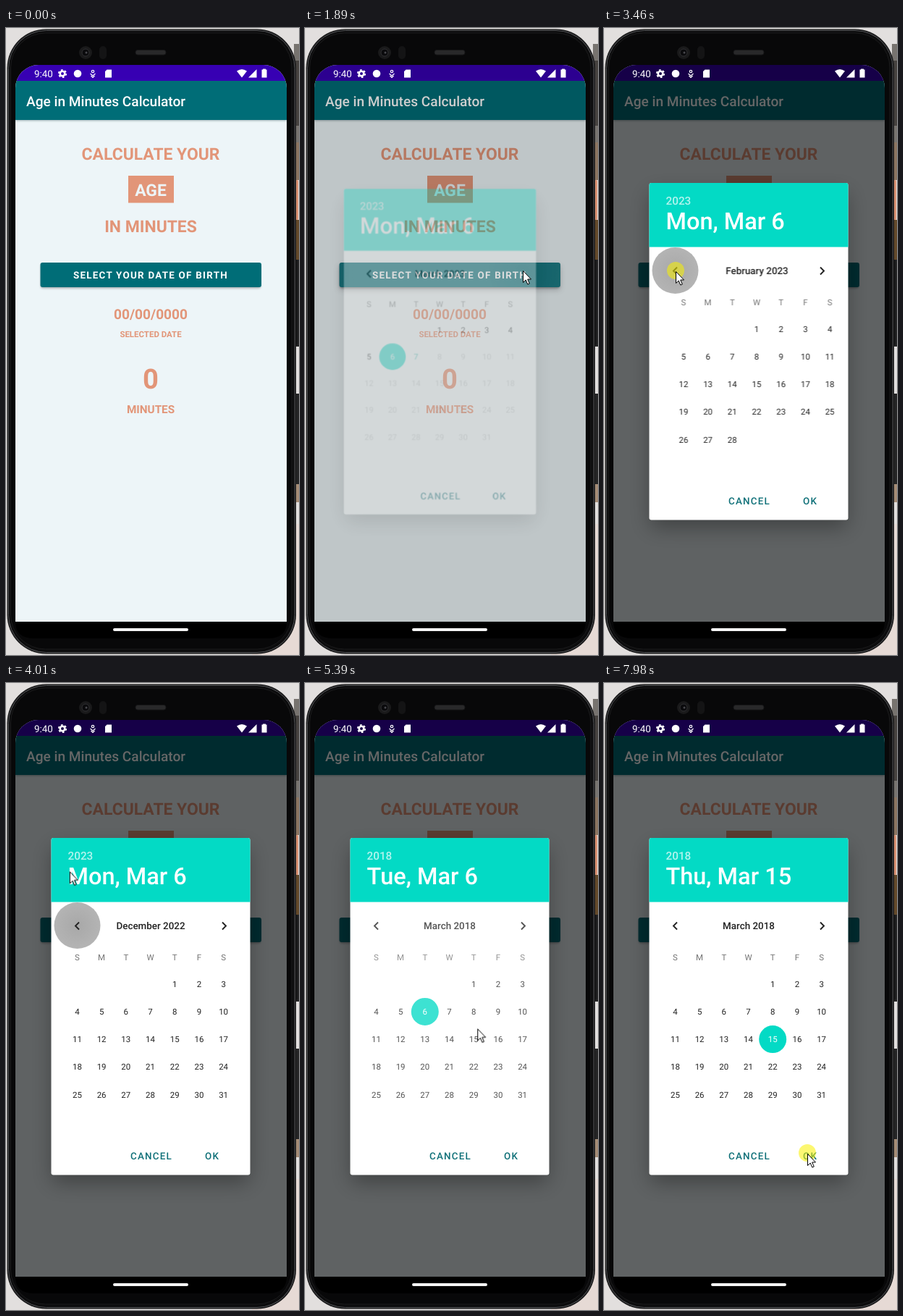
These frames come from a looping animation (405 by 866 pixels, 8000 ms). An HTML page:

```html
<!DOCTYPE html>
<html lang="en">
<head>
<meta charset="utf-8">
<title>Age in Minutes Calculator</title>
<style>
  html, body { margin: 0; width: 100%; height: 100%; overflow: hidden; background: #0b0b0b; }
  svg { display: block; font-family: Roboto, sans-serif; text-rendering: geometricPrecision; }
  text { white-space: pre; }
  .mid { text-anchor: middle; }
  .bold { font-weight: 700; }
  .med { font-weight: 500; }
  .orange { fill: #e29578; }
  .day { font-size: 11.46px; text-anchor: middle; fill: #222; }
  .week { fill: #757575; }
  .off { fill: #c6c6c6; }
  .today { fill: #2bb5a8; }
  .white { fill: #fff; }
  .action { font-size: 13.4px; font-weight: 500; letter-spacing: 1.2px; fill: #0f7078; }
  .date { font-size: 32.5px; font-weight: 500; }
  .year { font-size: 15.3px; font-weight: 500; }
  .row { font-size: 15.3px; text-anchor: middle; fill: #333; }
  .row.on { font-size: 24.8px; fill: #03dac5; }
  .chevron { fill: none; stroke: #222; stroke-width: 1.9; }

  .anim { animation: 8s linear infinite; }
  .hard { animation: 8s step-end infinite; }
  .grow { transform-box: fill-box; transform-origin: center; }

  #cursor { animation-name: cursor; }
  @keyframes cursor {
    0%, 5.6% { transform: translate(408px, 339px); }
    8% { transform: translate(340px, 322px); }
    10.5%, 28.2% { transform: translate(301px, 335px); }
    32.4% { transform: translate(125px, 363px); }
    34.4% { transform: translate(110px, 368px); }
    37.9%, 49.1% { transform: translate(99px, 336px); }
    50.1% { transform: translate(88px, 261px); }
    51.5%, 59.4% { transform: translate(81px, 236px); }
    63%, 65.2% { transform: translate(188px, 362px); }
    67.4% { transform: translate(238.5px, 478px); }
    69%, 69.5% { transform: translate(242px, 500px); }
    74.5% { transform: translate(264px, 618px); }
    79.1%, 83% { transform: translate(230px, 497px); }
    88.9%, 100% { transform: translate(281px, 650px); }
  }
  #press { animation-name: press; }
  @keyframes press {
    0%, 18.2%, 40.2%, 43.5%, 46.6%, 54.3%, 65%, 82% { opacity: 0; }
    16.5%, 39.1%, 42.4%, 45.5%, 53%, 64%, 80.4%, 99.7%, 100% { opacity: .55; }
  }
  #splash { animation-name: splash; }
  @keyframes splash {
    0%, 16.4% { transform: scale(.05); opacity: 0; }
    16.6% { transform: scale(.05); opacity: 1; }
    21%, 23% { transform: scale(1); opacity: 1; }
    25.4%, 100% { transform: scale(1); opacity: 0; }
  }
  #lift { animation-name: lift; }
  @keyframes lift {
    0%, 16.5%, 25.4%, 100% { opacity: 0; }
    18.5%, 23% { opacity: 1; }
  }
  #scrim { animation-name: appear; }
  @keyframes appear { 0%, 22.8% { opacity: 0; } 25.4%, 100% { opacity: 1; } }
  #dialog { animation-name: open; }
  @keyframes open {
    0%, 22.8% { opacity: 0; transform: scale(.95); }
    25.4%, 100% { opacity: 1; transform: none; }
  }
  #pager { animation-name: page; animation-timing-function: ease-out; }
  @keyframes page {
    0%, 40% { transform: none; }
    42.7%, 43.2% { transform: translateX(275px); }
    45.7%, 46.2% { transform: translateX(550px); }
    48.8%, 100% { transform: translateX(825px); }
  }
  #ripple { animation-name: ripple; }
  @keyframes ripple {
    0%, 39.1% { opacity: 0; transform: scale(.3); }
    41%, 58.8% { opacity: 1; transform: none; }
    59%, 100% { opacity: 0; transform: none; }
  }
  #calendar { animation-name: calendar; }
  @keyframes calendar {
    0%, 54.8% { opacity: 1; }
    58.8%, 65% { opacity: 0; }
    68.1%, 100% { opacity: 1; }
  }
  #years { animation-name: years; }
  @keyframes years {
    0%, 54.8% { opacity: 0; }
    58.8%, 65% { opacity: 1; }
    67.3%, 100% { opacity: 0; }
  }
  #yearTitle { animation-name: yearTitle; }
  @keyframes yearTitle { 0%, 65% { opacity: .7; } 54.8% { opacity: 1; } 100% { opacity: .7; } }
  #dateTitle { animation-name: dateTitle; }
  @keyframes dateTitle { 0%, 65% { opacity: 1; } 54.8% { opacity: .7; } 100% { opacity: 1; } }
  #rowPress { animation-name: rowPress; }
  @keyframes rowPress { 0%, 66.5% { opacity: 0; } 64% { opacity: .1; } 100% { opacity: 0; } }
  #dayPress { animation-name: dayPress; }
  @keyframes dayPress { 0%, 82% { opacity: 0; } 80.4% { opacity: .13; } 100% { opacity: 0; } }
  #next { animation-name: next; }
  @keyframes next { 0% { opacity: 0; } 42%, 100% { opacity: 1; } }

  /* Stages of the chosen date */
  .first { animation-name: first; }
  @keyframes first { 0% { opacity: 1; } 65%, 100% { opacity: 0; } }
  .changed { animation-name: changed; }
  @keyframes changed { 0% { opacity: 0; } 65%, 100% { opacity: 1; } }
  .second { animation-name: second; }
  @keyframes second { 0% { opacity: 0; } 65% { opacity: 1; } 82%, 100% { opacity: 0; } }
  .third { animation-name: third; }
  @keyframes third { 0% { opacity: 0; } 82%, 100% { opacity: 1; } }
</style>
</head>
<body>
<svg width="405" height="866" viewBox="0 0 405 866">
  <defs>
    <clipPath id="screenClip"><path d="M13 820V83A32 32 0 0 1 45 51H356A32 32 0 0 1 388 83V820Z"/></clipPath>
    <clipPath id="buttonClip"><rect x="47.500" y="324" width="305.500" height="34" rx="3"/></clipPath>
    <clipPath id="bodyClip"><rect x="62.500" y="302.500" width="275" height="324"/></clipPath>
    <filter id="soft" x="-30%" y="-30%" width="160%" height="170%"><feGaussianBlur stdDeviation="14"/></filter>
    <filter id="small" x="-10%" y="-50%" width="120%" height="220%"><feGaussianBlur stdDeviation="1.500"/></filter>
    <filter id="medium" x="-10%" y="-80%" width="120%" height="260%"><feGaussianBlur stdDeviation="4"/></filter>
    <radialGradient id="glow"><stop offset="0" stop-color="#fff" stop-opacity=".1"/><stop offset=".2" stop-color="#fff" stop-opacity=".17"/><stop offset=".85" stop-color="#fff" stop-opacity=".17"/><stop offset="1" stop-color="#fff" stop-opacity=".1"/></radialGradient>
    <radialGradient id="grey"><stop offset="0" stop-color="#a8a8a8"/><stop offset="1" stop-color="#b4b4b4"/></radialGradient>
  </defs>

  <!-- Room behind the phone -->
  <rect width="405" height="866" fill="#e2dfde"/>
  <path d="M398 22H405V45H398ZM398 135H405V158H398Z" fill="#77736f"/>
  <path d="M398 45H405V135H398Z" fill="#46423f"/>
  <path d="M398 158H405V210H398Z" fill="#8b7460"/>
  <path d="M398 265H405V320H398Z" fill="#63492a"/>
  <path d="M398 320H405V440H398ZM398 505H405V630H398Z" fill="#242425"/>
  <path d="M398 630H405V655H398Z" fill="#a58c76"/>
  <path d="M398 685H405V866H340Z" fill="#e6dad5"/>

  <!-- Phone -->
  <rect x="400" y="210" width="4" height="55" rx="1.500" fill="#d98f70"/>
  <rect x="399" y="320" width="4" height="118" rx="1.500" fill="#161617"/>
  <rect x="1.500" y="1.500" width="399.500" height="863" rx="54" fill="#1a1a1b"/>
  <rect x="3.500" y="3.500" width="395.500" height="859" rx="52" fill="#0c0c0d" stroke="#525356"/>
  <rect x="6.500" y="7" width="388.500" height="851" rx="48" fill="#080809" stroke="#1b1b1c"/>
  <path d="M13 815H388V820Q388 843 362 843H39Q13 843 13 820Z" fill="#000"/>
  <circle cx="110" cy="34" r="9" fill="#1a1a1b"/>
  <circle cx="110" cy="34" r="5" fill="#0a0a0c" stroke="#303033"/>
  <circle cx="111" cy="34" r="1.500" fill="#48484d"/>
  <rect x="129" y="25" width="10" height="18" rx="5" fill="#141415"/>
  <rect x="179" y="30.500" width="42" height="6.500" rx="3" fill="#29292a" stroke="#18181a"/>
  <rect x="148" y="829" width="104" height="4" rx="2" fill="#f4f4f4"/>

  <!-- App -->
  <g clip-path="url(#screenClip)">
    <rect x="13" y="51" width="375" height="769" fill="#edf5f8"/>
    <rect x="13" y="124" width="375" height="4" fill="#00262a" opacity=".35" filter="url(#small)"/>
    <rect x="13" y="73" width="375" height="54" fill="#006d77"/>
    <rect x="13" y="51" width="375" height="22" fill="#3700b3"/>
    <text class="med white" x="28" y="108" font-size="19.100">Age in Minutes Calculator</text>
    <g class="mid bold orange" font-size="22.900">
      <text x="200" y="182">CALCULATE YOUR</text>
      <rect x="169" y="204" width="63" height="37.500"/>
      <text x="200" y="231.800" fill="#edf5f8">AGE</text>
      <text x="200" y="281.500">IN MINUTES</text>
      <text x="200" y="402" font-size="19.100">00/00/0000</text>
      <text x="200" y="427" font-size="11.460">SELECTED DATE</text>
      <text x="200" y="498" font-size="38.200">0</text>
      <text x="200" y="531.500" font-size="15.300">MINUTES</text>
    </g>
    <rect x="48" y="326" width="304" height="33.500" rx="3" opacity=".3" filter="url(#small)"/>
    <rect id="lift" class="anim" x="47" y="328" width="306" height="34" rx="3" fill="#000" fill-opacity=".25" filter="url(#medium)"/>
    <rect x="47.500" y="324" width="305.500" height="34" rx="3" fill="#006d77"/>
    <g clip-path="url(#buttonClip)">
      <circle id="splash" class="anim grow" cx="301" cy="336" r="275" fill="url(#glow)"/>
    </g>
    <text class="bold white" x="93" y="346" font-size="13.400" letter-spacing="1.25">SELECT YOUR DATE OF BIRTH</text>
    <rect id="scrim" class="anim" x="13" y="51" width="375" height="769" fill="#000" fill-opacity=".6"/>
  </g>

  <!-- Status bar -->
  <g fill="#fff">
    <text x="39" y="68" font-size="13.400">9:40</text>
    <circle cx="78" cy="63" r="3.300" fill="none" stroke="#fff" stroke-width="2.600"/>
    <circle cx="78" cy="63" r="5.200" fill="none" stroke="#fff" stroke-width="1.800" stroke-dasharray="2.720"/>
    <circle cx="99" cy="63" r="5.300"/>
    <g fill="none" stroke="#fff" stroke-width="1.200"><circle cx="120" cy="60" r="1.700"/><path d="M116.500 63L120 66L123.500 63M117.500 66L120 68.500L122.500 66"/></g>
    <path d="M139.500 57.500H146V68.500H137V60Z"/>
    <path d="M319 59.500Q326 54.500 333 59.500L326 68.500Z"/>
    <path d="M346.500 57V68.500H335Z"/>
    <path d="M355 57.500V56.500H359V57.500H360.500V68.500H353.500V57.500Z"/>
  </g>

  <!-- Date picker -->
  <g id="dialog" class="anim grow">
    <rect x="64" y="228" width="272" height="462" rx="8" opacity=".32" filter="url(#soft)"/>
    <rect x="62.500" y="214" width="275" height="465.500" rx="3" fill="#fff"/>
    <path d="M62.500 302.500V217Q62.500 214 65.500 214H334.500Q337.500 214 337.500 217V302.500Z" fill="#03dac5"/>
    <g id="yearTitle" class="hard white">
      <text class="year hard first" x="85.500" y="243.500">2023</text>
      <text class="year hard changed" x="85.500" y="243.500">2018</text>
    </g>
    <g id="dateTitle" class="hard white">
      <text class="date hard first" x="85.500" y="277.500">Mon, Mar 6</text>
      <text class="date hard second" x="85.500" y="277.500">Tue, Mar 6</text>
      <text class="date hard third" x="85.500" y="277.500">Thu, Mar 15</text>
    </g>
    <g clip-path="url(#bodyClip)">
      <g id="calendar" class="anim">
        <g class="hard first"><g id="pager" class="anim"></g></g>
        <g id="picked" class="hard changed"></g>
        <circle id="ripple" class="anim grow" cx="98.500" cy="335" r="32" fill="url(#grey)"/>
        <path class="chevron" d="M101 330.500L96 335.500L101 340.500"/>
        <path id="next" class="chevron hard" d="M299 330.500L304 335.500L299 340.500"/>
      </g>
      <g id="years" class="anim">
        <rect id="rowPress" class="hard" x="62.500" y="338" width="275" height="48"/>
      </g>
    </g>
    <text class="action" x="172" y="658">CANCEL</text>
    <text class="action" x="275" y="658">OK</text>
  </g>

  <g id="cursor" class="anim">
    <circle id="press" class="hard" cx="0" cy="-1" r="12" fill="#faf200"/>
    <path d="M.5 .5V16.500L4.200 13L6.800 19L9.300 18L6.700 12H11.500Z" fill="#fff" stroke="#000"/>
  </g>
</svg>
<script>
  const $ = id => document.getElementById(id);
  const colX = col => 98.4 + col * 33.7;
  const rowY = row => 415.7 + row * 38.2;

  function add(parent, tag, attrs, label) {
    const el = document.createElementNS("http://www.w3.org/2000/svg", tag);
    for (const key in attrs) el.setAttribute(key, attrs[key]);
    if (label !== undefined) el.textContent = label;
    return parent.appendChild(el);
  }

  function cell(day, start) {
    const index = day - 1 + start;
    return { x: colX(index % 7), y: rowY(Math.floor(index / 7)) };
  }

  function month(parent, title, start, length, shift = 0, dayClass = () => "") {
    const page = add(parent, "g", { transform: `translate(${shift} 0)` });
    add(page, "text", { class: "mid med", x: 200, y: 340.2, "font-size": 13.4, fill: "#222" }, title);
    [..."SMTWTFS"].forEach((name, i) =>
      add(page, "text", { class: "day week", x: colX(i), y: 383.2 }, name));
    for (let day = 1; day <= length; day++) {
      const { x, y } = cell(day, start);
      add(page, "text", { class: "day " + dayClass(day), x, y: y + 4.1 }, day);
    }
    return page;
  }

  function select(page, day, start, stage) {
    const { x, y } = cell(day, start);
    const mark = add(page, "g", { class: stage });
    add(mark, "circle", { cx: x, cy: y, r: 19, fill: "#03dac5" });
    add(mark, "text", { class: "day white", x, y: y + 4.1 }, day);
  }

  const current = month($("pager"), "March 2023", 3, 31, 0,
    day => day === 7 ? "today" : day > 7 ? "off" : "");
  select(current, 6, 3, "");
  month($("pager"), "February 2023", 3, 28, -275);
  month($("pager"), "January 2023", 0, 31, -550);
  month($("pager"), "December 2022", 4, 31, -825);

  const picked = month($("picked"), "March 2018", 4, 31);
  select(picked, 6, 4, "hard second");
  const target = cell(15, 4);
  add(picked, "circle", { id: "dayPress", class: "hard", cx: target.x, cy: target.y, r: 19 });
  select(picked, 15, 4, "hard third");

  function yearRow(year, style) {
    const big = style.includes("on ");
    add($("years"), "text",
      { class: "row " + style, x: 200, y: 602 - (2023 - year) * 48 + (big ? 8.8 : 5.4) }, year);
  }
  for (let year = 2017; year <= 2023; year++) {
    if (year === 2023) {
      yearRow(year, "on hard first");
      yearRow(year, "hard changed");
    } else if (year === 2018) {
      yearRow(year, "hard first");
      yearRow(year, "on hard changed");
    } else yearRow(year, "");
  }
</script>
</body>
</html>
```
